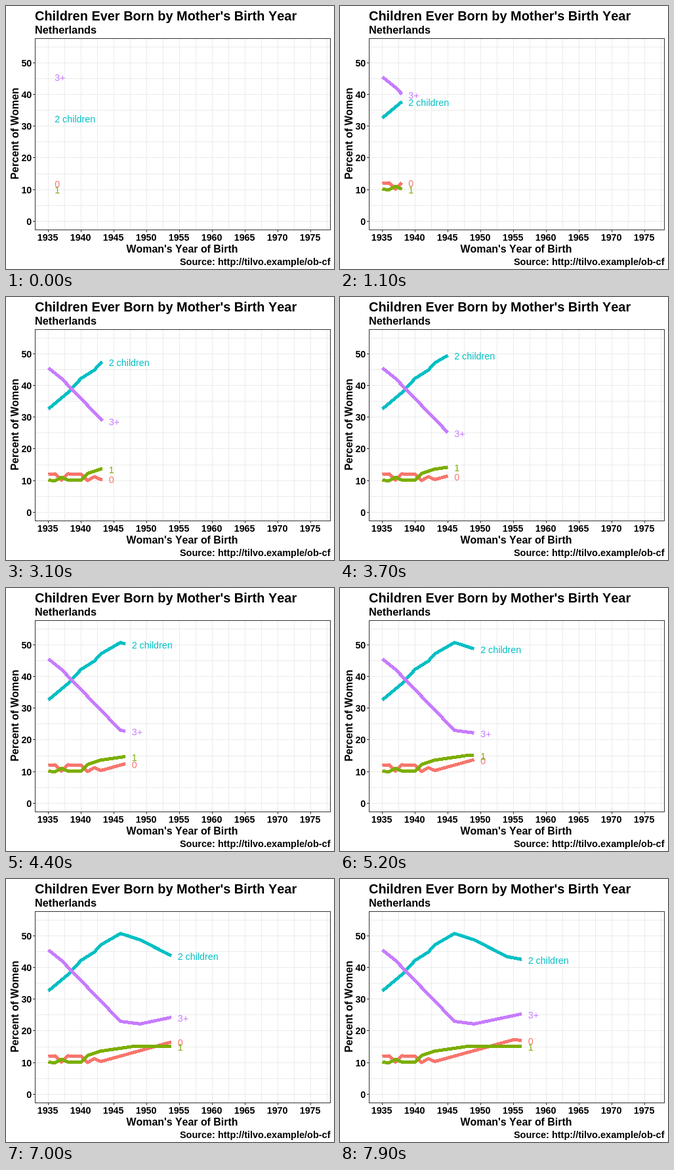
Recreate the animation shown at these times as an HTML page. Size 500x400 px, loop 8 s.

```html
<!DOCTYPE html>
<html lang="en">
<head>
<meta charset="utf-8">
<title>Children Ever Born</title>
<style>
  html, body { margin: 0; width: 100%; height: 100%; overflow: hidden; background: #fff; }
  svg { display: block; width: 500px; height: 400px; }
  text { font: bold 15.9px "Liberation Sans", Arial, sans-serif; font-kerning: none; }
  .title { font-size: 19.95px; }
  .subtitle { font-size: 16.3px; }
  .tick { font-size: 14.3px; }
  .caption { font-size: 14.5px; }
  .label { font-size: 14.3px; font-weight: normal; }
  .grid { stroke: #ebebeb; shape-rendering: crispEdges; }
  .axis { stroke: #333; fill: none; shape-rendering: crispEdges; }
  .series { fill: none; stroke-width: 5; stroke-linejoin: round; shape-rendering: crispEdges; }
  .end { text-anchor: end; }
  .mid { text-anchor: middle; }
</style>
</head>
<body>
<svg id="chart" viewBox="0 0 500 400">
  <text class="title" x="44" y="22">Children Ever Born by Mother's Birth Year</text>
  <text class="subtitle" x="44" y="42">Netherlands</text>
  <g id="scales"></g>
  <rect class="axis" x="44.5" y="49.5" width="450" height="291"/>
  <text class="mid" x="268.5" y="375">Woman's Year of Birth</text>
  <text class="mid" transform="translate(19 194) rotate(-90)">Percent of Women</text>
  <text class="caption end" x="494.5" y="393.7">Source: http://tilvo.example/ob-cf</text>
  <g id="lines"></g>
  <g id="labels"></g>
</svg>
<script>
const FRAME_MS = 100, FRAMES = 80, FRAMES_PER_YEAR = 149 / 40;
const FIRST_YEAR = 1935;

const xOf = year => 64.5 + year * 10;
const yOf = percent => 327.15 - percent * 4.808;

// Turning points: [years after the first, percent]
const series = [
  { name: '0', color: '#F8766D', keys: [[0, 11.9], [1, 12.1], [2, 10.1], [3, 12.1], [5, 12], [6, 10],
    [7, 11.2], [8, 10.3], [20, 17.2], [22, 16.9]] },
  { name: '1', color: '#7CAE00', keys: [[0, 10.1], [1, 9.9], [2, 11], [3, 10.1], [5, 10.1], [6, 12.2],
    [8, 13.6], [13, 15.1], [22, 15.2]] },
  { name: '2 children', color: '#00BFC4', keys: [[0, 32.6], [3, 37.8], [5, 42.3], [7, 44.9], [8, 47.2],
    [11, 50.8], [14, 48.8], [19, 43.5], [22, 42.3]] },
  { name: '3+', color: '#C77CFF', keys: [[0, 45.6], [2, 42.3], [11, 23], [14, 22.2], [22, 25.7]] }
];

const $ = id => document.getElementById(id);

function add(parent, tag, attrs, text) {
  const el = document.createElementNS('http://www.w3.org/2000/svg', tag);
  for (const key in attrs) el.setAttribute(key, attrs[key]);
  if (text) el.textContent = text;
  return parent.appendChild(el);
}

function drawScales() {
  const g = $('scales');
  const line = (cls, d) => add(g, 'path', { class: cls, d });
  for (let year = 0; year < 43; year += 2.5) line('grid', `M${xOf(year)} 50V340`);
  for (let pct = 0; pct <= 55; pct += 5) line('grid', `M45 ${yOf(pct)}H494`);
  for (let year = 0; year <= 40; year += 5) {
    line('axis', `M${xOf(year)} 341V344`);
    add(g, 'text', { class: 'tick mid', x: xOf(year) - 0.9, y: 357 }, String(FIRST_YEAR + year));
  }
  for (let pct = 0; pct <= 50; pct += 10) {
    line('axis', `M41 ${yOf(pct)}H44`);
    add(g, 'text', { class: 'tick end', x: 39.3, y: Math.floor(yOf(pct)) + 5.5 }, String(pct));
  }
}

// Each year begins on a whole frame; the time between runs evenly.
const keyFrame = year => Math.round(year * FRAMES_PER_YEAR);

function yearAt(frame) {
  let year = 0;
  while (keyFrame(year + 1) <= frame) year++;
  const start = keyFrame(year);
  return year + (frame - start) / (keyFrame(year + 1) - start);
}

function percentAt(keys, year) {
  const next = keys.findIndex(key => key[0] > year);
  const [x0, p0] = keys[next - 1], [x1, p1] = keys[next];
  return p0 + (p1 - p0) * (year - x0) / (x1 - x0);
}

function draw(frame) {
  const year = yearAt(frame);
  for (const s of series) {
    const tip = [year, percentAt(s.keys, year)];
    const path = [...s.keys.filter(key => key[0] < year), tip];
    s.line.setAttribute('points', path.map(([x, p]) => `${xOf(x)},${yOf(p)}`).join(' '));
    s.label.setAttribute('x', xOf(year) + 9.7);
    s.label.setAttribute('y', Math.round(yOf(tip[1]) + 6.5));
  }
}

drawScales();
for (const s of series) {
  s.line = add($('lines'), 'polyline', { class: 'series', stroke: s.color });
  s.label = add($('labels'), 'text', { class: 'label', fill: s.color }, s.name);
}

let shown = -1;
function tick() {
  const frame = Math.floor(performance.now() / FRAME_MS) % FRAMES;
  if (frame !== shown) draw(shown = frame);
  requestAnimationFrame(tick);
}
tick();
</script>
</body>
</html>
```
